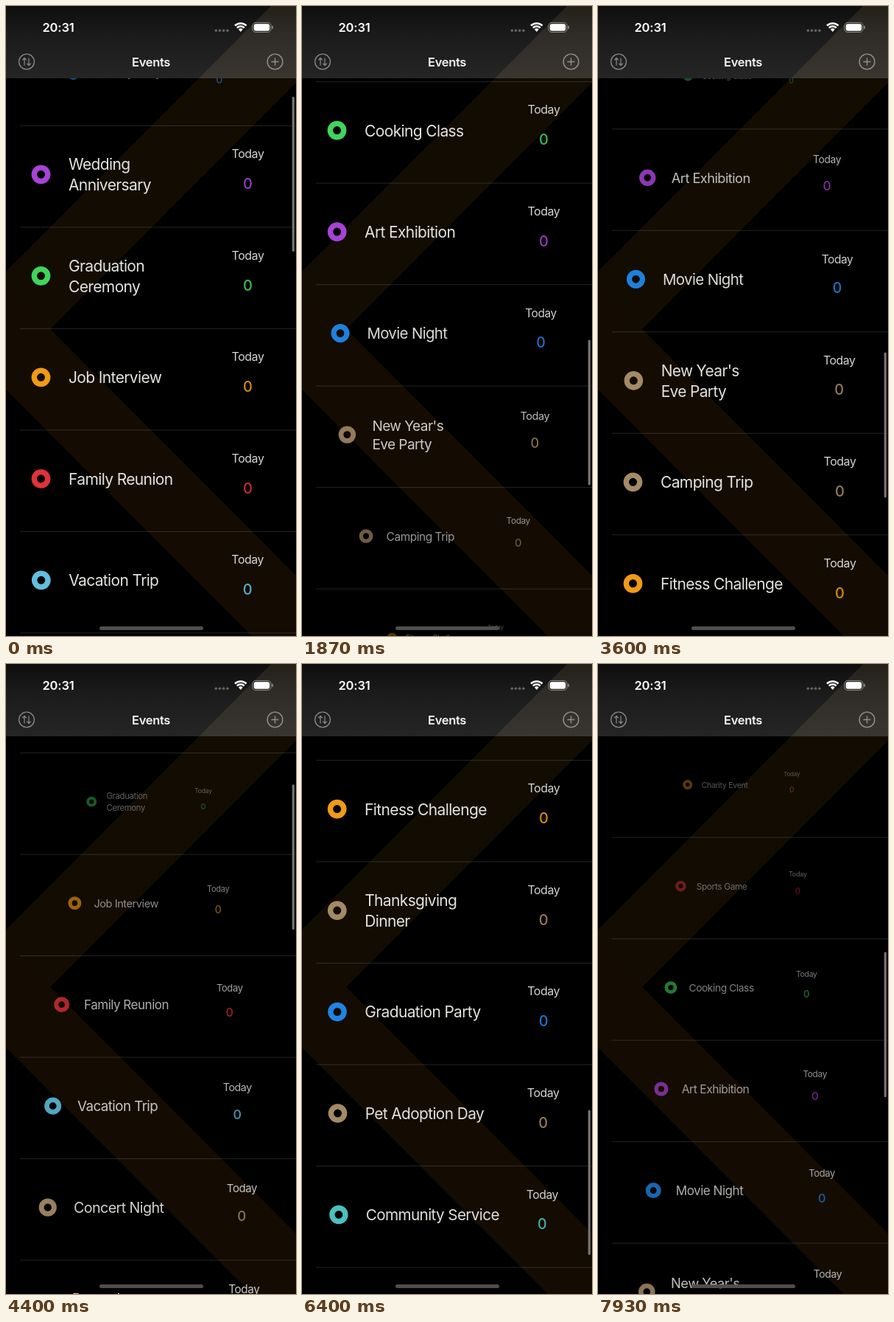
These frames come from a looping animation (394 by 854 pixels, 8 s). An HTML page with a canvas:

```html
<!DOCTYPE html>
<html lang="en">
<head>
<meta charset="utf-8">
<title>Events</title>
<style>
  html, body { margin: 0; width: 100%; height: 100%; overflow: hidden; background: #000; }
  canvas { display: block; width: 394px; height: 854px; }
</style>
</head>
<body>
<canvas></canvas>
<script>
const W = 394, H = 854, LOOP = 8000;
const ROW = 137.5, HEADER = 98, PIVOT = { x: 197, y: 66 };
const FONT = 'Inter, "Noto Sans", sans-serif';

const canvas = document.querySelector('canvas');
const ctx = canvas.getContext('2d');
const dpr = window.devicePixelRatio || 1;
canvas.width = W * dpr;
canvas.height = H * dpr;

const C = {
  purple: '#a742d6', green: '#41d45c', orange: '#f09a16', red: '#e0323b', sky: '#62bfe0',
  yellow: '#dcc91a', brown: '#a58a66', blue: '#2085e4', teal: '#4cc4c4'
};

const events = [
  ['Birthday Party', C.blue], ['Wedding\nAnniversary', C.purple], ['Graduation\nCeremony', C.green],
  ['Job Interview', C.orange], ['Family Reunion', C.red], ['Vacation Trip', C.sky],
  ['Concert Night', C.brown], ["Doctor's\nAppointment", C.yellow], ['Book Club Meeting', C.brown],
  ['Charity Event', C.orange], ['Sports Game', C.red], ['Cooking Class', C.green],
  ['Art Exhibition', C.purple], ['Movie Night', C.blue], ["New Year's\nEve Party", C.brown],
  ['Camping Trip', C.brown], ['Fitness Challenge', C.orange], ['Thanksgiving\nDinner', C.brown],
  ['Graduation Party', C.blue], ['Pet Adoption Day', C.brown], ['Community Service', C.teal]
].map(([name, color]) => ({ lines: name.split('\n'), color }));

// Scroll keys: time in ms, offset in px, velocity in px/s.
const scrollKeys = [
  [-700, -98, 0], [0, -25, 160], [250, 100, 1200], [1200, 892.5, 340], [1350, 935, 350],
  [1500, 1030, 1150], [2600, 1892.5, 430], [2850, 1975, 0], [3000, 1900, -900],
  [3600, 1483.5, -300], [3700, 1435, -700], [3850, 1270, -2000], [4700, -98, 0],
  [4930, -98, 0], [5130, 61.5, 1500], [5400, 700, 2900], [6050, 2067, 500],
  [6200, 2085, 0], [6400, 2069.5, -20], [6600, 2067.5, 0], [7540, 2067.5, 0],
  [7695, 1873, -2900], [7930, 1143, -3100], [8000, 930, -2950]
];

function scrollAt(t) {
  let k = 1;
  while (k < scrollKeys.length - 1 && scrollKeys[k][0] < t) k++;
  const [t0, a, va] = scrollKeys[k - 1], [t1, b, vb] = scrollKeys[k];
  const d = t1 - t0, s = (t - t0) / d, r = 1 - s;
  return a * r * r * (1 + 2 * s) + b * s * s * (3 - 2 * s)
    + d / 1000 * s * r * (va * r - vb * s);
}

// A row is shown while its middle lies inside the list; each crossing starts a spring.
const isInside = (i, t) => {
  const middle = ROW * (i + 0.5) - scrollAt(t);
  return middle > 121 && middle < H;
};

events.forEach((event, i) => {
  let state = event.initial = +isInside(i, -700);
  event.crossings = [];
  for (let t = -700; t < LOOP; t += 4) {
    const next = +isInside(i, t);
    if (next !== state) event.crossings.push({ t, change: next - state });
    state = next;
  }
});

function spring(ms) {
  const x = Math.max(0, ms) * 2 * Math.PI / 550;
  return 1 - (1 + x) * Math.exp(-x);
}

const presence = (event, t) => event.crossings.reduce(
  (sum, c) => sum + c.change * spring(t - c.t), event.initial);

function text(str, x, y, size, { weight = 400, align = 'left', color = '#e6e4df', spacing = -0.03 } = {}) {
  ctx.font = `${weight} ${size}px ${FONT}`;
  ctx.letterSpacing = `${size * spacing}px`;
  ctx.textAlign = align;
  ctx.fillStyle = color;
  ctx.fillText(str, x, y);
}

function polygon(color, ...points) {
  ctx.fillStyle = color;
  ctx.beginPath();
  points.forEach(([x, y]) => ctx.lineTo(x, y));
  ctx.fill();
}

function pill(x, y, w, h, r, color) {
  ctx.fillStyle = color;
  ctx.beginPath();
  ctx.roundRect(x, y, w, h, r);
  ctx.fill();
}

function circle(x, y, r, color, width) {
  ctx.beginPath();
  ctx.arc(x, y, r, 0, 2 * Math.PI);
  ctx.lineWidth = width;
  ctx.strokeStyle = color;
  ctx.stroke();
}

function stroke(path, color, width) {
  ctx.strokeStyle = color;
  ctx.lineWidth = width;
  ctx.stroke(new Path2D(path));
}

function drawBackground() {
  ctx.fillStyle = '#000';
  ctx.fillRect(0, 0, W, H);
  polygon('#120c02', [360, 0], [W, 0], [W, 104], [0, 498], [0, 360]);
  polygon('#140c03', [0, 378], [W, 772], [W, H], [334, H], [0, 520]);
}

function drawRow(event, top, p) {
  const scale = 0.5 + 0.5 * p;
  ctx.save();
  ctx.globalAlpha = 0.37 + 0.63 * p;
  ctx.translate(PIVOT.x, top + PIVOT.y);
  ctx.scale(scale, scale);
  ctx.translate(-PIVOT.x, -PIVOT.y);
  circle(47.5, 66, 9.2, event.color, 7.4);
  event.lines.forEach((line, n) =>
    text(line, 85, 74 + 28 * (n - (event.lines.length - 1) / 2), 21));
  text('Today', 328.5, 43.7, 16, { align: 'center', color: '#d6d5d2' });
  ctx.globalAlpha *= 0.9;
  text('0', 328.5, 85.7, 20, { weight: 500, align: 'center', color: event.color, spacing: 0 });
  ctx.restore();
}

function drawList(t, offset) {
  events.forEach((event, i) => {
    const top = ROW * i - offset;
    if (top > H || top + ROW < 0) return;
    drawRow(event, top, presence(event, t));
    ctx.fillStyle = 'rgba(255,255,255,.14)';
    ctx.fillRect(19, top + ROW - 0.5, W - 19, 1);
  });
}

function drawScrollBar(t, offset) {
  const early = t < 1700;
  const top = 105 + (offset + 98) * (early ? 0.2463 : 0.2305);
  const bottom = Math.min(801, top + (early ? 210 : 197));
  pill(388.7, top, 3.2, bottom - top, 1.6, '#77736f');
}

function drawHeader() {
  const shade = ctx.createLinearGradient(0, 0, 0, HEADER);
  shade.addColorStop(0, '#0e0e0e');
  shade.addColorStop(0.4, '#1b1b1c');
  shade.addColorStop(1, '#252526');
  ctx.fillStyle = shade;
  ctx.fillRect(0, 0, W, HEADER);
  polygon('rgba(255,205,140,.09)', [360, 0], [W, 0], [W, HEADER], [262, HEADER]);

  text('20:31', 71, 35, 16.5, { weight: 600, align: 'center', color: '#fff', spacing: -0.01 });
  text('Events', 197, 81.7, 16.5, { weight: 600, align: 'center', color: '#f4f4f4', spacing: -0.02 });

  for (let i = 0; i < 4; i++) pill(283.5 + i * 5.2, 31.5, 3.6, 3.6, 1.8, '#67645f');

  // Wi-Fi fan
  ctx.strokeStyle = '#fff';
  ctx.lineWidth = 2.5;
  for (const r of [11, 7]) {
    ctx.beginPath();
    ctx.arc(318.8, 34.5, r, -Math.PI * 0.75, -Math.PI * 0.25);
    ctx.stroke();
  }
  ctx.fillStyle = '#fff';
  ctx.beginPath();
  ctx.moveTo(318.8, 35);
  ctx.arc(318.8, 34.5, 4, -Math.PI * 0.75, -Math.PI * 0.25);
  ctx.fill();

  // Battery
  ctx.strokeStyle = '#8d8983';
  ctx.lineWidth = 1;
  ctx.beginPath();
  ctx.roundRect(335, 22.5, 25, 13, 4.2);
  ctx.stroke();
  pill(336.8, 24.2, 21.4, 9.6, 2.7, '#fff');
  pill(361.3, 26.8, 1.6, 4.4, 0.8, '#8d8983');

  circle(28, 75.5, 10.4, '#85858a', 1.4);
  stroke('M25 80.5V70.5M22.3 73.2L25 70.5L27.7 73.2M31 70.5V80.5M28.3 77.8L31 80.5L33.7 77.8', '#85858a', 1.3);
  circle(365.5, 75.5, 10.4, '#93908c', 1.4);
  stroke('M360.5 75.5H370.5M365.5 70.5V80.5', '#93908c', 1.4);
}

function draw(now) {
  const t = now % LOOP, offset = scrollAt(t);
  ctx.setTransform(dpr, 0, 0, dpr, 0, 0);
  drawBackground();
  drawList(t, offset);
  drawScrollBar(t, offset);
  drawHeader();
  pill(127, 841, 141, 5, 2.5, '#4f4e4d');
}

const start = performance.now();
function tick() {
  draw(performance.now() - start);
  requestAnimationFrame(tick);
}
tick();
</script>
</body>
</html>
```
